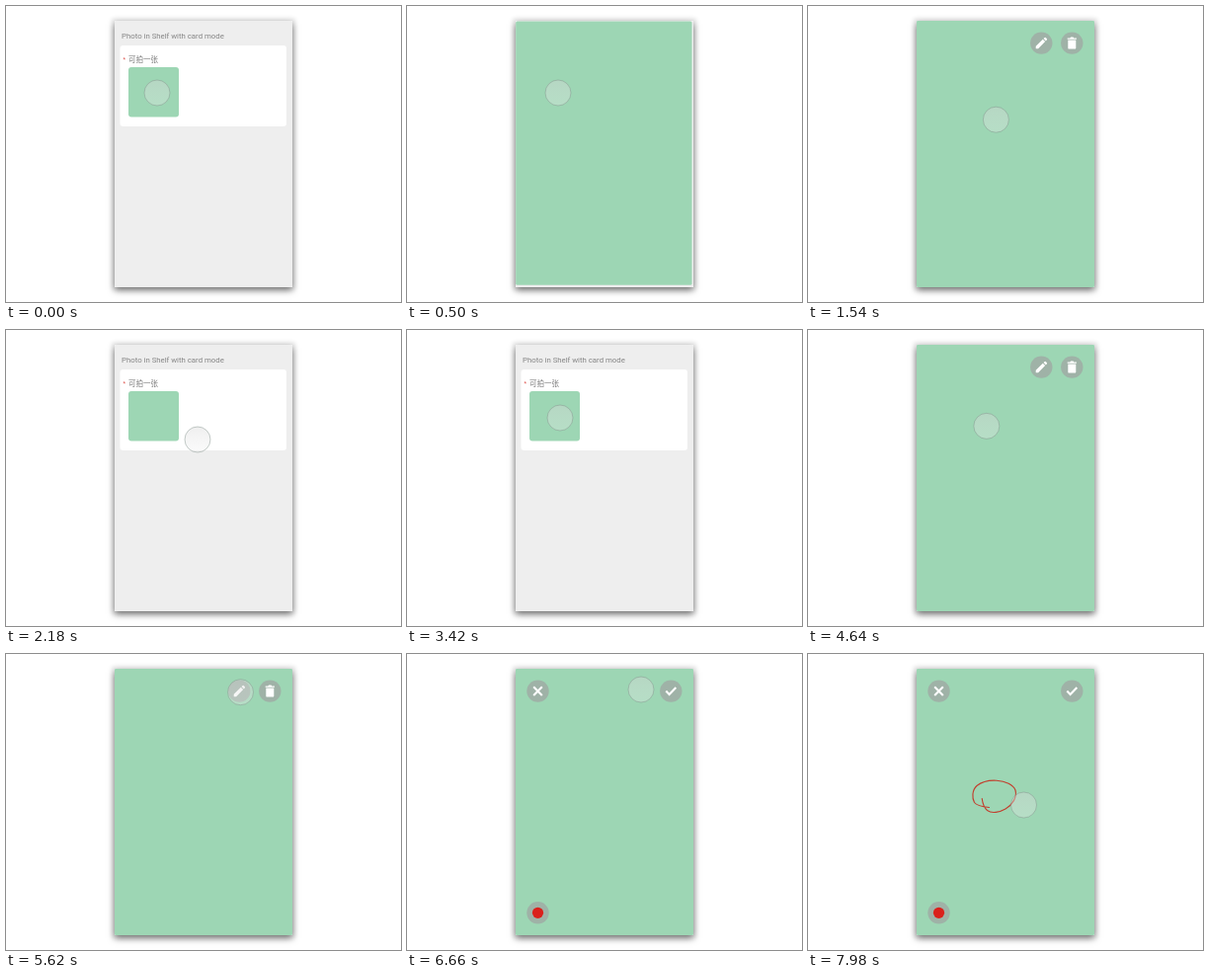
An HTML page that plays this animation: 400 px wide and 300 px high, repeating every 8000 ms.

```html
<!DOCTYPE html>
<html lang="en">
<head>
<meta charset="utf-8">
<title>Photo card</title>
<style>
html, body { margin: 0; width: 100%; height: 100%; overflow: hidden; background: #fff; }
.phone { position: absolute; left: 110px; top: 15px; width: 180px; height: 270px;
  box-shadow: 0 0 4px 3px rgba(0,0,0,.07), 0 3px 7px rgba(0,0,0,.55); }
svg { position: absolute; left: 0; top: 0; display: block; }
.title { font: 7.8px Roboto, sans-serif; fill: #858585; }
.label { font: 7.5px "Noto Sans CJK SC", "Noto Sans CJK", sans-serif; fill: #777; }
.disc { fill: #a0a5a2; fill-opacity: .72; }
.line { fill: none; stroke: #fff; stroke-width: 2.1; }
</style>
</head>
<body>
<div class="phone"></div>
<svg width="400" height="300" viewBox="0 0 400 300">
  <defs>
    <clipPath id="screen"><rect x="110" y="15" width="180" height="270" rx="1"/></clipPath>
    <linearGradient id="glass" x1="0" y1="0" x2="0" y2="1">
      <stop offset="0" stop-color="#d8d8d8" stop-opacity=".42"/>
      <stop offset="1" stop-color="#f0f0f0" stop-opacity=".3"/>
    </linearGradient>
  </defs>
  <g clip-path="url(#screen)">
    <rect x="110" y="15" width="180" height="270" fill="#eee"/>
    <text class="title" x="117" y="33">Photo in Shelf with card mode</text>
    <rect x="115.5" y="40" width="168.5" height="82" rx="3" fill="#fff"/>
    <text class="label" x="118" y="58" style="fill:#e0605a">*</text>
    <text class="label" x="124" y="57">可拍一张</text>
    <rect id="photo" fill="#9dd6b4"/>
    <g id="viewBar">
      <g transform="translate(236.3 37.6)">
        <circle class="disc" r="11.2"/>
        <path fill="#fff" d="M-5.6 5.6V3.2L1.5-3.9 3.9-1.5-3.2 5.6ZM2.2-4.6 3.4-5.6Q4-6 4.6-5.4L5.4-4.6Q6-4 5.6-3.4L4.6-2.2Z"/>
      </g>
      <g transform="translate(267.3 37.6)">
        <circle class="disc" r="11.2"/>
        <path fill="#fff" d="M-4.6-5.2H-2L-1.2-6H1.2L2-5.2H4.6V-3.8H-4.6ZM-4-3H4V4.8Q4 6 2.8 6H-2.8Q-4 6-4 4.8Z"/>
      </g>
    </g>
    <g id="editBar">
      <g transform="translate(132.5 37.6)">
        <circle class="disc" r="11.2"/>
        <path class="line" d="M-4.3-4.3 4.3 4.3M4.3-4.3-4.3 4.3"/>
      </g>
      <g transform="translate(267.3 37.6)">
        <circle class="disc" r="11.2"/>
        <path class="line" d="M-5 0-1.7 3.4 5-3.6"/>
      </g>
    </g>
    <g id="record">
      <circle class="disc" cx="132.5" cy="262.3" r="11.2"/>
      <circle cx="132.5" cy="262.3" r="5.6" fill="#da201c"/>
    </g>
    <path id="ink" pathLength="1" fill="none" stroke="#c23f2e" stroke-width="1.15" stroke-linecap="round"
      d="M183.5 155.5C178 155 171 154 168.500 150.500C166 146 166 138 171 133.500C176 129.500 184 127.800 191 128.200C200 128.700 208 132.500 210 138C212 145 207 153 200 157C194 160.500 186 162 181.500 158.500C178 155.500 176.800 151 176.200 146.500"/>
  </g>
  <circle id="touch" r="13" fill="url(#glass)" stroke="#7f8f87" stroke-opacity=".5" stroke-width=".9"/>
</svg>
<script>
const LOOP = 8000;
const $ = id => document.getElementById(id);
const clamp = v => Math.max(0, Math.min(1, v));
const span = (t, a, b) => clamp((t - a) / (b - a));
const mix = (a, b, p) => a + (b - a) * p;
const linear = u => u;
const outQuad = u => 1 - (1 - u) ** 2;
const inOut = u => u < .5 ? 2 * u * u : 1 - 2 * (1 - u) ** 2;

// cubic-bezier(.4, 0, .2, 1)
function standard(u) {
  let lo = 0, hi = 1, s = u;
  for (let i = 0; i < 18; i++) {
    s = (lo + hi) / 2;
    const x = 1.2 * s * (1 - s) ** 2 + .6 * s * s * (1 - s) + s ** 3;
    if (x < u) lo = s; else hi = s;
  }
  return u <= 0 ? 0 : u >= 1 ? 1 : 3 * s * s * (1 - s) + s ** 3;
}
const ease = (t, a, b) => standard(span(t, a, b));

// start, end, control x, y, end x, y, easing
const moves = [
  [1140, 1660, 177, 134.6, 194, 111, inOut],
  [2460, 3140, 204, 144, 155, 89, inOut],
  [4440, 5240, 266, 130, 240.5, 45.5, inOut],
  [5240, 5620, 238.5, 42, 237.5, 38.7, outQuad],
  [5860, 6100, 237.3, 37, 237, 36, inOut],
  [7020, 7480, 88, 120, 182, 149, inOut],
  [7700, 7980, 200, 130, 218.5, 153, linear]
];

function touchAt(t) {
  let x = 153, y = 88;
  for (const [a, b, cx, cy, ex, ey, fn] of moves) {
    if (t < a) break;
    const u = fn(span(t, a, b));
    const bend = (p, c, e) => mix(mix(p, c, u), mix(c, e, u), u);
    x = bend(x, cx, ex);
    y = bend(y, cy, ey);
  }
  return [x, y];
}

const set = (el, attrs) => { for (const k in attrs) el.setAttribute(k, attrs[k]); };

function slide(id, shown, dist) {
  set($(id), {
    transform: `translate(0 ${dist * (1 - shown)})`,
    visibility: shown > 0 ? "visible" : "hidden"
  });
}

function draw(t) {
  const open = ease(t, 100, 570) - ease(t, 1770, 2180) + ease(t, 3420, 3895);
  const left = mix(124, 110, open), top = mix(62, 15, open);
  set($("photo"), {
    x: left, y: top,
    width: mix(175, 290, open) - left,
    height: mix(112.5, 285, open) - top,
    rx: open >= 1 ? 0 : mix(3, 1.5, open)
  });

  const view = ease(t, 520, 880) - ease(t, 1770, 2180)
    + ease(t, 3860, 4220) - ease(t, 5860, 6240);
  const edit = ease(t, 6260, 6660);
  slide("viewBar", view, -36);
  slide("editBar", edit, -36);
  slide("record", edit, 36);

  const ink = span(t, 7700, 7980);
  set($("ink"), {
    "stroke-dasharray": `${ink} 2`,
    visibility: ink > 0 ? "visible" : "hidden"
  });

  const [x, y] = touchAt(t);
  set($("touch"), { cx: x, cy: y });
}

const start = performance.now();
function tick() {
  draw((performance.now() - start) % LOOP);
  requestAnimationFrame(tick);
}
tick();
</script>
</body>
</html>
```
